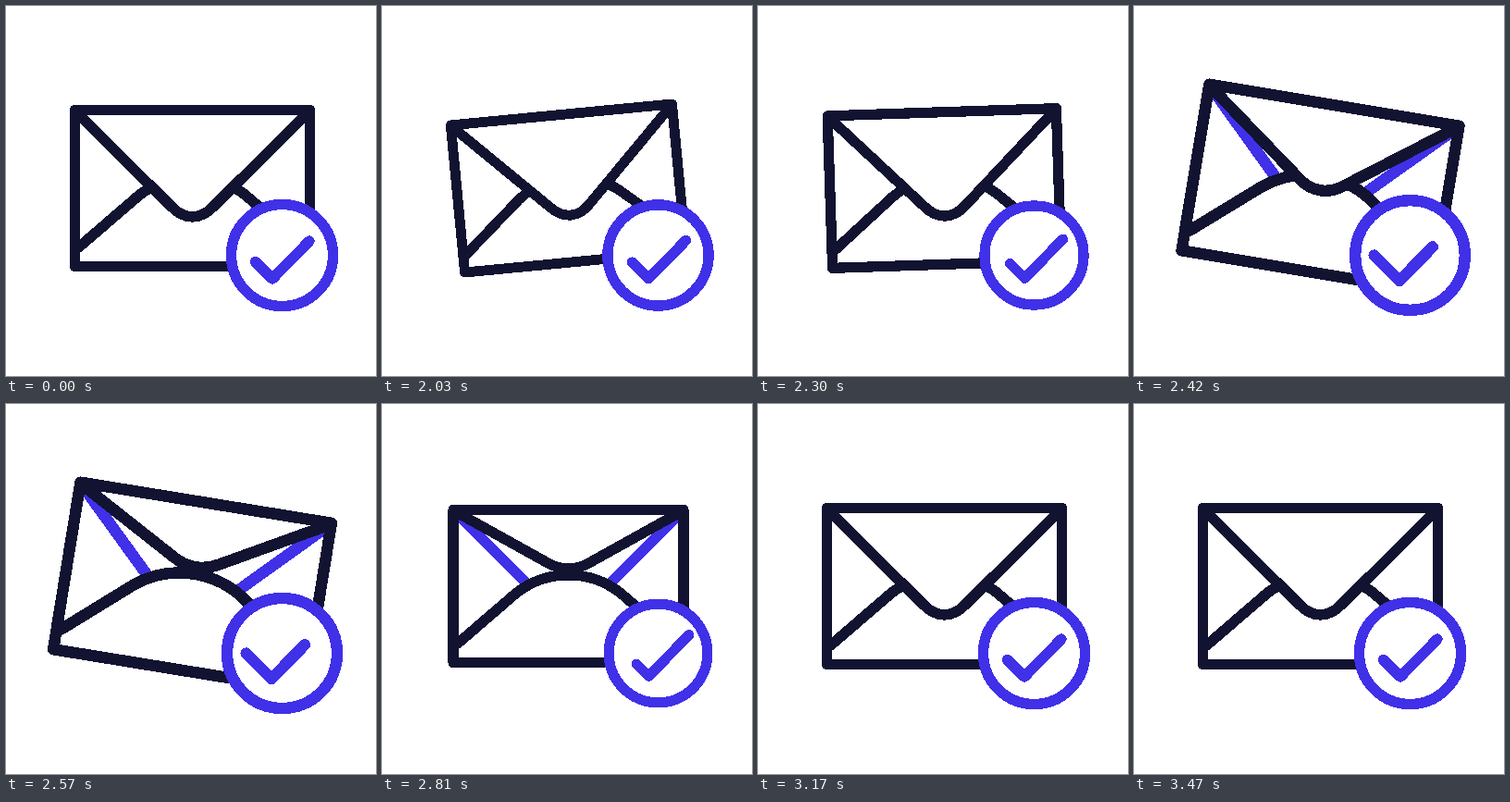
Write an HTML page that moves like this. It is 400 by 400 pixels and loops after 3.59 s.

```html
<!DOCTYPE html>
<html lang="en">
<head>
<meta charset="utf-8">
<title>Envelope with check</title>
<style>
  html, body { margin: 0; height: 100%; overflow: hidden; background: #fff; }
  svg { display: block; width: 100%; height: 100%; shape-rendering: crispEdges; }
  path, rect, circle { fill: none; stroke-width: 11.5; stroke-linecap: round; stroke-linejoin: round; }
  .dark { stroke: #121331; }
  .blue { stroke: #4030e8; }
  .paper { fill: #fff; }
</style>
</head>
<body>
<svg viewBox="0 0 400 400">
  <g id="envelope">
    <path id="inside" class="blue"/>
    <path class="dark paper" d="M79 260.5L144 204.5C178 178 225 178 259 204.5L324 260.5"/>
    <path id="flap" class="dark paper"/>
    <rect class="dark" x="74.5" y="112.5" width="254" height="169"/>
  </g>
  <g id="badge">
    <circle class="blue paper" cx="298.5" cy="269.5" r="55"/>
    <path id="check" class="blue"/>
  </g>
</svg>
<script>
const LOOP = 3590, START = 2030, STEP = 30;
const LOW = 2165, HIGH = 2490, BACK = 2810, REBOUND = 2965, REST = 3100;
const CLOSED = 217, LIFT = 45.5;
const el = id => document.getElementById(id);

// Eased progress from 0 to 1 between two times.
function ease(t, from, to) {
  const p = Math.min(1, Math.max(0, (t - from) / (to - from)));
  return (1 - Math.cos(Math.PI * p)) / 2;
}

// Dips to -1, swings up to 1, then rebounds around 0 by the given amount.
function swing(t, start, bounce) {
  const echo = bounce * .7;
  return -ease(t, start, LOW) + 2 * ease(t, LOW, HIGH)
    - (1 + bounce) * ease(t, HIGH, BACK)
    + (bounce + echo) * ease(t, BACK, REBOUND) - echo * ease(t, REBOUND, REST);
}

function flapPath(y) {
  const low = y + 14.5 * (y - 114) / 103;
  return `M75.5 114L179 ${y}C193 ${low} 210 ${low} 224 ${y}L327.5 114`;
}

const around = (x, y, scale, angle = 0) =>
  `translate(${x} ${y}) rotate(${angle}) scale(${scale}) translate(${-x} ${-y})`;

function draw(now) {
  const time = now % LOOP;
  const t = time < START ? 0 : time - (time - START) % STEP;
  const scale = 1 + .1 * swing(t, 1880, .2);
  const angle = 11.3 * swing(t + 10, 1920, 0);
  const open = ease(t, 2300, 2520) - ease(t, BACK, 3025);
  const slide = -9 * swing(t, 2000, .55);
  el('envelope').setAttribute('transform', around(201.5, 197, scale, angle));
  el('flap').setAttribute('d', flapPath(CLOSED - LIFT * open));
  el('badge').setAttribute('transform', around(298.5, 269.5, 1 + .1 * swing(t, 2000, .3)));
  el('check').setAttribute('d', `M${269.5 + slide} ${276.5 + slide}L288 295L${328 + slide} ${254 - slide}`);
  requestAnimationFrame(draw);
}

el('inside').setAttribute('d', flapPath(CLOSED));
draw(0);
</script>
</body>
</html>
```
